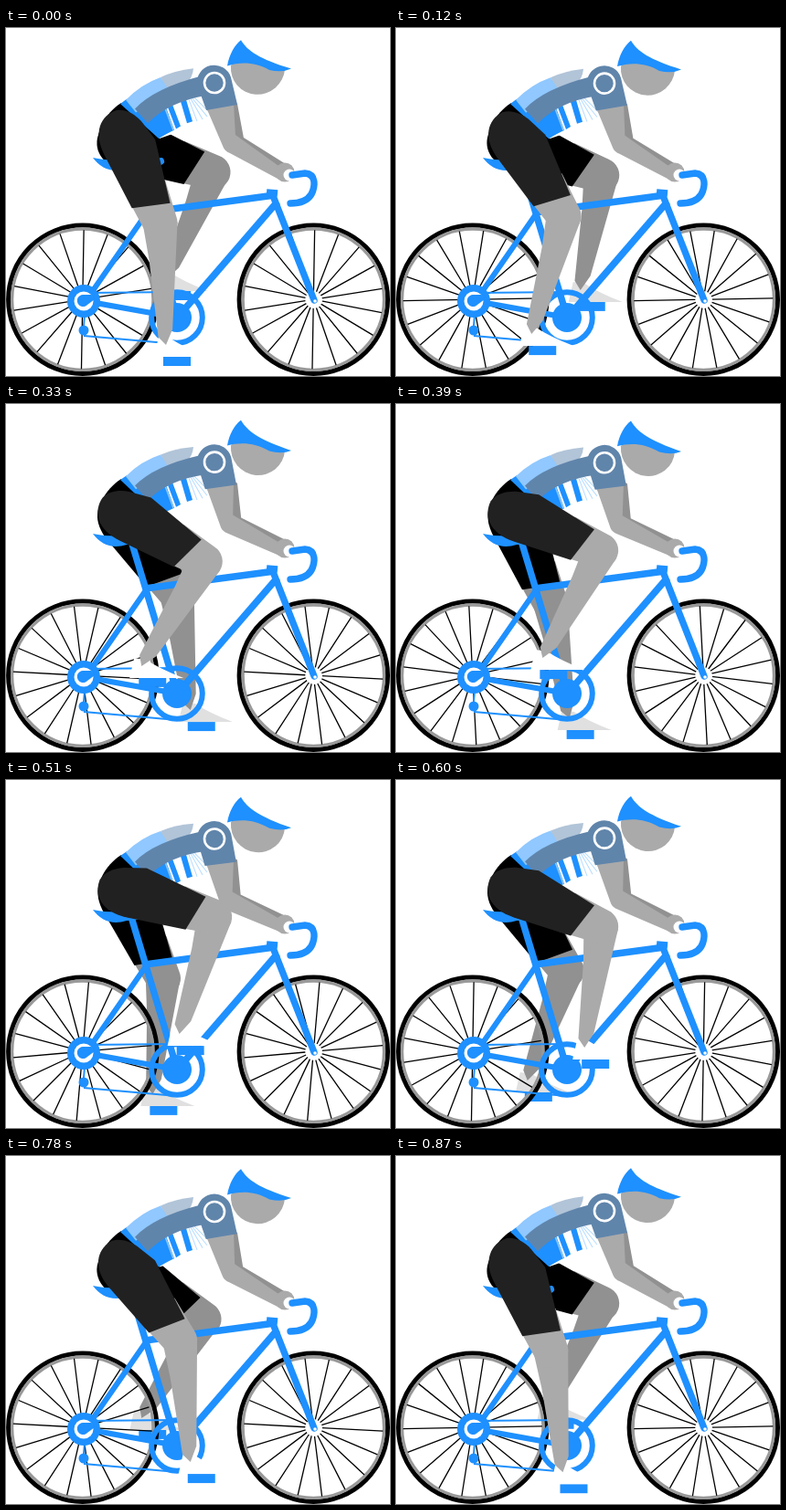
An HTML page that plays this animation: 420x381 px, repeating every 0.9 s.

```html
<!DOCTYPE html>
<html lang="en">
<head>
<meta charset="utf-8">
<title>Cyclist</title>
<style>
  html, body { margin: 0; width: 100%; height: 100%; overflow: hidden; background: #fff; }
  svg { display: block; width: 100vw; height: 100vh; }
  .tube { fill: none; stroke: #1e90ff; stroke-width: 7.4; }
  .thin { fill: none; stroke: #1e90ff; stroke-width: 2; }
  .blue { fill: #1e90ff; }
  .steel { fill: #6085ab; }
  .skin { fill: #aaa; }
  .dim { fill: #919191; }
</style>
</head>
<body>
<svg viewBox="0 0 420 381">
  <defs>
    <g id="wheel">
      <circle r="81.2" fill="none" stroke="#000" stroke-width="5"/>
      <circle r="77.2" fill="none" stroke="#999" stroke-width="3.4"/>
      <path class="spokes" stroke="#000" stroke-width="1.3"/>
    </g>
    <path id="thigh" d="M75 23L10 30C-18 33 -32 18 -31 0C-29 -10 -20 -17 -10 -21L14 -28L85 -18Z"/>
    <path id="knee" d="M60 24L101 19A19 19 0 0 0 101 -19L60 -22Z"/>
    <path id="shoe" d="M-25 -5L-20 -27L-7 -25Q8 -15 34 -5Z"/>
    <rect id="pedal" x="-15" y="-5" width="30" height="10" class="blue"/>
  </defs>

  <g id="far">
    <use href="#pedal" class="foot"/>
    <use href="#shoe" class="foot" fill="#e0e0e0"/>
    <path class="shin dim"/>
    <use href="#knee" class="upper dim"/>
    <use href="#thigh" class="upper" fill="#000"/>
  </g>

  <use href="#wheel" x="83.8" y="297.2"/>
  <use href="#wheel" x="336.3" y="297.2"/>
  <circle cx="337" cy="298" r="9" fill="#fff"/>

  <g id="bike">
    <path class="blue" d="M95 142Q115 147 171 142Q177 147 168 151L132 154Q109 161 95 142Z"/>
    <path class="tube" d="M137 150L187 316M152 202L294 183"/>
    <path class="tube" d="M297 190L190 314"/>
    <path class="tube" stroke-linecap="round" d="M291 181L298 199L337 298"/>
    <path class="tube" d="M285 180L297 181"/>
    <path class="tube" style="stroke-width:6" d="M155 201L87 299L187 317"/>
    <path class="thin" d="M85 290L187 289M85 337L187 346M86 314L85 326"/>
    <circle class="blue" cx="85" cy="331" r="5.5"/>
    <circle class="blue" cx="85" cy="299" r="18"/>
    <circle cx="85" cy="299" r="10.5" fill="#fff"/>
    <path class="blue" d="M93 292L97 297L89 303A6.5 6.5 0 1 1 84 292Z"/>
    <circle class="tube" style="stroke-width:6" cx="187" cy="317" r="27.8"/>
    <circle class="blue" cx="187" cy="317" r="16"/>
    <circle cx="338" cy="299" r="1.8" fill="#fff"/>
  </g>

  <path d="M126 82C108 94 97 114 102 132L150 135L166 122Z" fill="#000"/>
  <path id="farArm" class="dim"/>
  <g id="torso">
    <path d="M143 91L210 62L222 104L168 122Z" fill="#fff"/>
    <path class="blue" d="M125 83L132 78L145 91L155 104Q166 93 175 88L184 113Q177 116 167 122Z"/>
    <path class="blue" d="M177 88L182 85L191 109L186 112ZM191 82L197 80L204 104L198 106Z"/>
    <path d="M174 89L183 113" stroke="#90c8ff" stroke-width="1.5"/>
    <path d="M200 80L209 104M202 79L215 102M204 79L220 99M206 78L223 95" stroke="#b5dcff" fill="none"/>
    <path fill="#90c8ff" d="M131 79Q148 62 169 55L180 68L142 93Z"/>
    <path fill="#b1c4d8" d="M169 55Q184 48 205 46Q204 57 197 62L178 69Z"/>
    <path class="steel" d="M141 89Q162 67 212 55L218 76Q178 82 155 105Z"/>
    <path class="skin" d="M246 44A29.5 29.5 0 0 0 305 49L280 37H250Z"/>
    <path class="blue" d="M242 44C244 32 250 21 257 16C264 28 277 37 312 48.5Q302 53 288 49.5C272 40 256 40 242 44Z"/>
  </g>
  <g id="near">
    <use href="#pedal" class="foot"/>
    <use href="#shoe" class="foot" fill="#fff"/>
    <path class="shin skin"/>
    <use href="#knee" class="upper skin"/>
    <use href="#thigh" class="upper" fill="#212121"/>
  </g>

  <path id="arm" class="skin"/>
  <circle class="skin" cx="305" cy="158" r="10.5"/>
  <circle cx="310" cy="161" r="6.5" fill="#fff"/>
  <path class="tube" stroke-linecap="round" d="M313 161L327 159C340 160 338 174 334 182Q328 192 311 192"/>
  <g id="sleeve">
    <path class="steel" d="M-19 2A19 19 0 0 1 18 -6L25 24L-9 30Z"/>
    <circle r="11" fill="none" stroke="#fff" stroke-width="2.6"/>
  </g>
</svg>
<script>
const LOOP = 900, STEP = 30, SPOKES = 18, TAU = Math.PI * 2;
const $ = s => document.querySelector(s);
const place = (el, x, y, a = 0) =>
  el.setAttribute('transform', `translate(${x} ${y}) rotate(${a * 360 / TAU})`);

$('.spokes').setAttribute('d', Array.from({ length: SPOKES }, (_, i) => {
  const c = Math.cos(i * TAU / SPOKES), s = Math.sin(i * TAU / SPOKES);
  return `M${c * 9} ${s * 9}L${c * 76} ${s * 76}`;
}).join(''));

// Middle joint of a two-bone limb; side picks the bend direction.
function joint(x, y, tx, ty, l1, l2, side) {
  const d = Math.hypot(tx - x, ty - y);
  const cos = Math.min(1, (l1 * l1 + d * d - l2 * l2) / (2 * l1 * d));
  const a = Math.atan2(ty - y, tx - x) + side * Math.acos(cos);
  return { x: x + l1 * Math.cos(a), y: y + l1 * Math.sin(a), a };
}

function makeLeg(id, hx, hy, l1, l2) {
  const root = $(id), all = s => root.querySelectorAll(s), shin = root.querySelector('.shin');
  shin.setAttribute('d', `M0 -19L${l2 - 17} -8L${l2} 0L${l2 - 9} 8L40 14L0 19Z`);
  return turn => {
    const px = 187 - 36 * Math.sin(turn), py = 329 + 36 * Math.cos(turn);
    const ax = px - 12, ay = py - 18;
    const k = joint(hx, hy, ax, ay, l1, l2, -1);
    all('.foot').forEach(el => place(el, px, py));
    all('.upper').forEach(el => place(el, hx, hy, k.a));
    place(shin, k.x, k.y, Math.atan2(ay - k.y, ax - k.x));
  };
}

const near = makeLeg('#near', 132, 119, 101, 134);
const far = makeLeg('#far', 131, 125, 100, 128);

function draw(now) {
  const t = Math.floor(now % LOOP / STEP) * STEP;
  const turn = t / LOOP * TAU;
  near(turn);
  far(turn + Math.PI);
  $('.spokes').setAttribute('transform', `rotate(${11 + t / LOOP * 360})`);

  // The upper body dips more the further it is from the hip.
  const lean = -0.021 * Math.cos(turn - 0.1);
  $('#torso').setAttribute('transform', `matrix(1 ${lean} 0 1 0 ${-120 * lean})`);
  const sx = 228, sy = 62.3 + 108 * lean;
  const e = joint(sx, sy, 304, 159, 65.5, 66.3, 1);
  place($('#sleeve'), sx, sy, e.a - 1.25);
  $('#arm').setAttribute('d', `M${sx - 9} ${sy + 27}L${e.x - 11} ${e.y + 9}Q${e.x - 9} ${e.y + 13} ${e.x - 4} ${e.y + 15}` +
    `L299 166L301 153L${e.x + 2} ${e.y - 5}L${sx + 21} ${sy + 22}Z`);
  $('#farArm').setAttribute('d', `M${sx + 16} ${sy + 18}L${sx + 25} ${sy + 23}L${e.x + 11} ${e.y - 2}L306 149L300 160L${e.x} ${e.y}Z`);
}

const start = performance.now();
(function tick() {
  draw(performance.now() - start);
  requestAnimationFrame(tick);
})();
</script>
</body>
</html>
```
